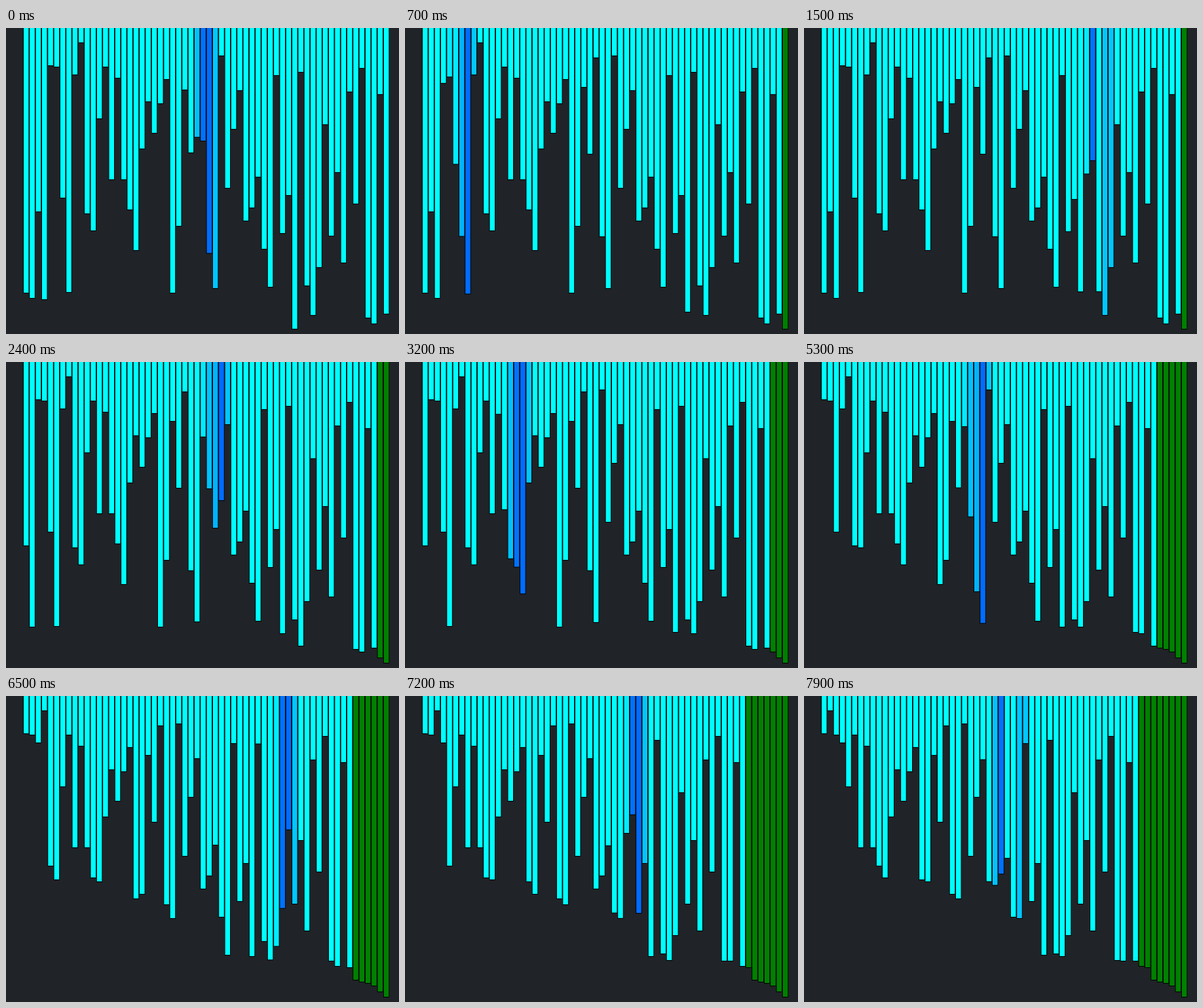
An HTML page with a canvas for the animation above (8 s loop, 600 px wide and 467 px high).

```html
<!DOCTYPE html>
<html lang="en">
<head>
<meta charset="utf-8">
<title>Bubble sort</title>
<style>
  html, body { margin: 0; width: 100%; height: 100%; overflow: hidden; background: #202327; }
  canvas { display: block; }
</style>
</head>
<body>
<canvas id="stage" width="600" height="467"></canvas>
<script>
const LOOP = 8000, STEP = 100;
const TICK = 1000 / 60;          // screen refresh in ms
const FADE = 100;                // length of each bar transition in ms
const CYAN = [255, 255], BLUE = [0, 255], GREEN = [128, 0];   // green and blue channels

// The first pass is under way, carrying the bar at START.
const START = 24;
const bars = [
  404, 412, 280, 414, 57, 59, 259, 403, 71, 22, 283, 309, 138, 59, 231,
  76, 231, 277, 339, 184, 112, 160, 115, 78, 433, 404, 302, 90, 192, 45,
  318, 397, 42, 244, 154, 95, 294, 274, 227, 337, 395, 72, 313, 255, 459,
  67, 393, 438, 365, 147, 317, 220, 358, 97, 268, 61, 442, 451, 101, 436
];

// Pace of the sort: number of swaps done by a given tick.
const SWAPS = [0, 70, 147, 201, 249, 306, 372];
const TICKS = [0, 90, 192, 258, 318, 390, 474];

function swapTime(k) {
  let s = 0;
  while (s < SWAPS.length - 2 && k >= SWAPS[s + 1]) s++;
  const slope = (TICKS[s + 1] - TICKS[s]) / (SWAPS[s + 1] - SWAPS[s]);
  return (Math.round(TICKS[s] + (k - SWAPS[s]) * slope) - 1) * TICK;
}

// CSS "ease": cubic-bezier(.25, .1, .25, 1)
function ease(x) {
  if (x <= 0) return 0;
  if (x >= 1) return 1;
  const curve = (a, b, s) => 3 * (1 - s) * (1 - s) * s * a + 3 * (1 - s) * s * s * b + s * s * s;
  let lo = 0, hi = 1;
  for (let n = 0; n < 20; n++) {
    const mid = (lo + hi) / 2;
    if (curve(.25, .25, mid) < x) lo = mid; else hi = mid;
  }
  return curve(.1, 1, lo);
}

const same = (a, b) => a.every((v, i) => v === b[i]);
const progress = (m, t) => m.scale ? ease((t - m.start) / (FADE * m.scale)) : 1;

function valueOf(m, t) {
  const p = progress(m, t);
  return m.to.map((v, i) => m.from[i] + (v - m.from[i]) * p);
}

const track = v => [{ from: v, to: v, back: v, start: -1e4, scale: 1 }];

// Adds a transition; turning back midway shortens it, as in CSS.
function moveTo(list, to, t) {
  const m = list[list.length - 1];
  if (same(m.to, to)) return;
  const from = valueOf(m, t);
  const next = { from, to, back: from, start: t, scale: 1 };
  if (same(m.back, to)) {
    next.back = m.to;
    next.scale = progress(m, t) * m.scale + 1 - m.scale;
  }
  list.push(next);
}

function at(list, t) {
  let n = list.length - 1;
  while (n > 0 && list[n].start > t + .01) n--;
  return valueOf(list[n], t);
}

const heights = bars.map(h => track([h]));
const colors = bars.map(() => track(CYAN));

function sort() {
  let k = START - 29, now = swapTime(k - 1), lit = [];
  for (let last = bars.length - 1; last > 0; last--) {
    for (let j = last === bars.length - 1 ? START : 0; j < last; j++) {
      if (bars[j] <= bars[j + 1]) continue;
      const pair = [j, j + 1];
      for (const i of lit) {
        if (!pair.includes(i)) moveTo(colors[i], i > last ? GREEN : CYAN, now);
      }
      for (const i of pair) moveTo(colors[i], BLUE, now);
      lit = pair;
      now = swapTime(k++);
      if (now > LOOP) return;
      [bars[j], bars[j + 1]] = [bars[j + 1], bars[j]];
      for (const i of pair) moveTo(heights[i], [bars[i]], now);
    }
    moveTo(colors[last], GREEN, now);
  }
}
sort();

const ctx = document.getElementById("stage").getContext("2d");

function draw(t) {
  ctx.fillStyle = "#202327";
  ctx.fillRect(0, 0, 600, 467);
  for (let i = 0; i < bars.length; i++) {
    const x = 27 + i * 9.32;
    const [h] = at(heights[i], t);
    const [g, b] = at(colors[i], t).map(Math.round);
    ctx.fillStyle = "#000";
    ctx.fillRect(x - .9, 0, 9.2, h + 1);
    ctx.fillStyle = `rgb(0, ${g}, ${b})`;
    ctx.fillRect(x, 0, 7.5, h);
  }
}

const begin = performance.now();
let shown = -1;
function frame() {
  const t = Math.floor((performance.now() - begin) % LOOP / STEP) * STEP;
  if (t !== shown) draw(shown = t);
  requestAnimationFrame(frame);
}
frame();
</script>
</body>
</html>
```
